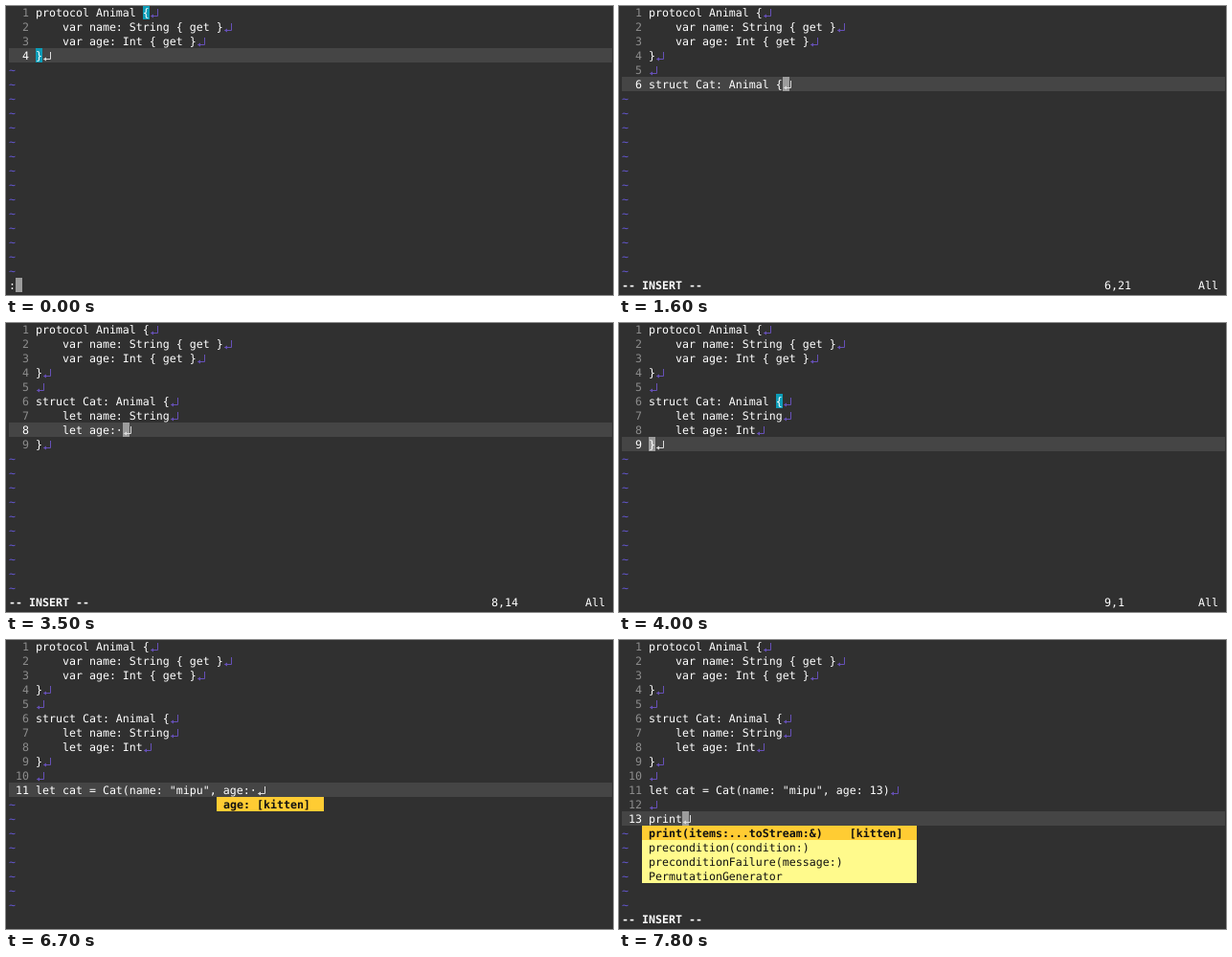
Recreate the animation shown at these times as an HTML page. Size 634 by 302 pixels, loop 8 s.

```html
<!DOCTYPE html>
<html lang="en">
<head>
<meta charset="utf-8">
<title>Editor session</title>
<style>
  html, body { margin: 0; width: 100%; height: 100%; overflow: hidden; background: #303030; }
  svg { display: block; width: 634px; height: 302px; }
  text {
    font-family: "DejaVu Sans Mono", "Liberation Mono", monospace;
    font-size: 11.627px;
    text-rendering: geometricPrecision;
    white-space: pre;
    fill: #fff;
  }
  .bold { font-weight: bold; }
</style>
</head>
<body>
<svg id="screen" viewBox="0 0 634 302"></svg>
<script>
const LOOP = 8000, CELL = 7, ROW = 15, LEFT = 3, GUTTER = 4, COMMAND_ROW = 19;
const COLOR = {
  line: '#454545', number: '#8c8c8c', tilde: '#6558d6', eol: '#6650b8',
  cursor: '#9c9c9c', match: '#0c9db8', pick: '#ffcc33', menu: '#fffa8c', ink: '#111'
};

const SOURCE = [
  'protocol Animal {',
  '    var name: String { get }',
  '    var age: Int { get }',
  '}',
  '',
  'struct Cat: Animal {',
  '    let name: String',
  '    let age: Int',
  '}',
  '',
  'let cat = Cat(name: "mipu", age: 13)',
  '',
  'print'
];

const nameMenu = { col: 14, width: 17, items: ['name: [kitten]'] };
const ageMenu = { col: 28, width: 16, items: ['age: [kitten]'] };
const printMenu = {
  col: 0, width: 41,
  items: ['print(items:...toStream:&)    [kitten]', 'precondition(condition:)',
          'preconditionFailure(message:)', 'PermutationGenerator']
};

// Each step: the cursor is on `row`, with `length` characters of that line typed.
const steps = [];
const step = (time, row, length, extra = {}) =>
  steps.push({ time, row, length, mode: 'insert', tail: [], marks: [], ...extra });
const type = (start, row, lengths, extra) =>
  lengths.forEach((length, i) => step(start + i * 100, row, length, extra));

const closing = { tail: ['}'] };
const animalBraces = [[0, 16], [3, 0]];
const catBraces = [[5, 19], [8, 0]];

step(0, 3, 1, { mode: 'command', marks: animalBraces });
step(100, 3, 1, { mode: 'normal', col: 0, marks: animalBraces });
step(200, 4, 0);
type(300, 5, [0, 1, 2, 3, 4, 6, 7, 9, 11, 12, 14, 16, 18, 20]);
step(1700, 6, 4);
step(1800, 6, 1, { text: '}', marks: [[5, 19], [6, 0]] });
step(1900, 6, 1, { text: '}', mode: 'normal', col: 0, marks: [[5, 19], [6, 0]] });
type(2000, 6, [4, 6, 8, 10, 12, 14, 15], closing);
type(2800, 6, [18, 20], closing);
type(3000, 7, [4, 5, 7], closing);
type(3400, 7, [10, 13, 14], closing);
step(3800, 7, 16, closing);
step(3900, 7, 16, { ...closing, mode: 'normal', col: 15 });
step(4000, 8, 1, { mode: 'normal', col: 0, marks: catBraces });
step(4100, 9, 0);
type(4200, 10, [0, 2, 4]);
type(4600, 10, [6, 7]);
type(4900, 10, [9, 11]);
step(5200, 10, 14, { mode: 'busy', menu: nameMenu });
step(5300, 10, 19);
type(5500, 10, [20, 21]);
type(5800, 10, [22, 24, 25]);
type(6200, 10, [26, 27, 28]);
step(6500, 10, 29, { menu: ageMenu });
step(6700, 10, 33, { mode: 'busy', menu: ageMenu });
step(6800, 10, 34);
step(7000, 10, 35);
step(7100, 10, 36, { marks: [[10, 13], [10, 35]] });
step(7200, 11, 0);
type(7300, 12, [0, 1]);
step(7600, 12, 2);
step(7700, 12, 4, { mode: 'busy', menu: printMenu });
step(7800, 12, 5, { menu: printMenu });

const xOf = col => LEFT + col * CELL;
const topOf = row => row * ROW - 1;
const escape = s => s.replace(/&/g, '&amp;').replace(/</g, '&lt;');

const block = (col, row, cols, fill) =>
  `<rect x="${xOf(col)}" y="${topOf(row)}" width="${cols * CELL}" height="${ROW}" fill="${fill}"/>`;

const label = (col, row, text, fill = '#fff', bold = false) =>
  `<text x="${xOf(col)}" y="${topOf(row) + 12}" style="fill:${fill}"${bold ? ' class="bold"' : ''}>${escape(text)}</text>`;

function lineEnd(col, row, color) {
  const x = xOf(col), y = topOf(row);
  return `<path d="M${x + 8.5} ${y + 4}V${y + 11.5}H${x + 1.5}" fill="none" stroke="${color}"/>` +
         `<path d="M${x + 1} ${y + 11.5}l3 -2v4z" fill="${color}"/>`;
}

function drawLine(text, row, active) {
  const shown = active ? text.replace(/ +$/, s => '·'.repeat(s.length)) : text;
  return label(0, row, String(row + 1).padStart(3), active ? '#fff' : COLOR.number) +
         label(GUTTER, row, shown) +
         lineEnd(GUTTER + text.length, row, active ? '#ddd' : COLOR.eol);
}

function drawMenu({ col, width, items }, row) {
  return items.map((item, i) => {
    const y = row + 1 + i;
    return block(GUTTER + col - 1, y, width, i ? COLOR.menu : COLOR.pick) +
           label(GUTTER + col, y, item, COLOR.ink, i === 0);
  }).join('');
}

function drawStatus(s) {
  if (s.mode === 'command') return block(1, COMMAND_ROW, 1, COLOR.cursor) + label(0, COMMAND_ROW, ':');
  if (s.mode === 'busy') return '';
  const mode = s.mode === 'insert' ? label(0, COMMAND_ROW, '-- INSERT --', '#fff', true) : '';
  if (s.menu) return mode;
  const column = (s.col ?? s.length) + 1;
  return mode + label(72, COMMAND_ROW, `${s.row + 1},${column}`) + label(86, COMMAND_ROW, 'All');
}

function draw(s) {
  const current = s.text ?? SOURCE[s.row].slice(0, s.length);
  const lines = [...SOURCE.slice(0, s.row), current, ...s.tail];
  let out = `<rect width="634" height="302" fill="#303030"/>` + block(0, s.row, 90, COLOR.line);
  for (const [row, col] of s.marks) out += block(GUTTER + col, row, 1, COLOR.match);
  if (s.mode === 'insert' || s.mode === 'normal')
    out += block(GUTTER + (s.col ?? s.length), s.row, 1, COLOR.cursor);
  lines.forEach((text, row) => { out += drawLine(text, row, row === s.row); });
  for (let row = lines.length; row < COMMAND_ROW; row++) out += label(0, row, '~', COLOR.tilde);
  if (s.menu) out += drawMenu(s.menu, s.row);
  return out + drawStatus(s);
}

const screen = document.getElementById('screen');
const start = performance.now();
let shown = null;

function tick() {
  const time = (performance.now() - start) % LOOP;
  const now = steps.findLast(s => s.time <= time);
  if (now !== shown) {
    screen.innerHTML = draw(now);
    shown = now;
  }
  requestAnimationFrame(tick);
}
tick();
</script>
</body>
</html>
```
